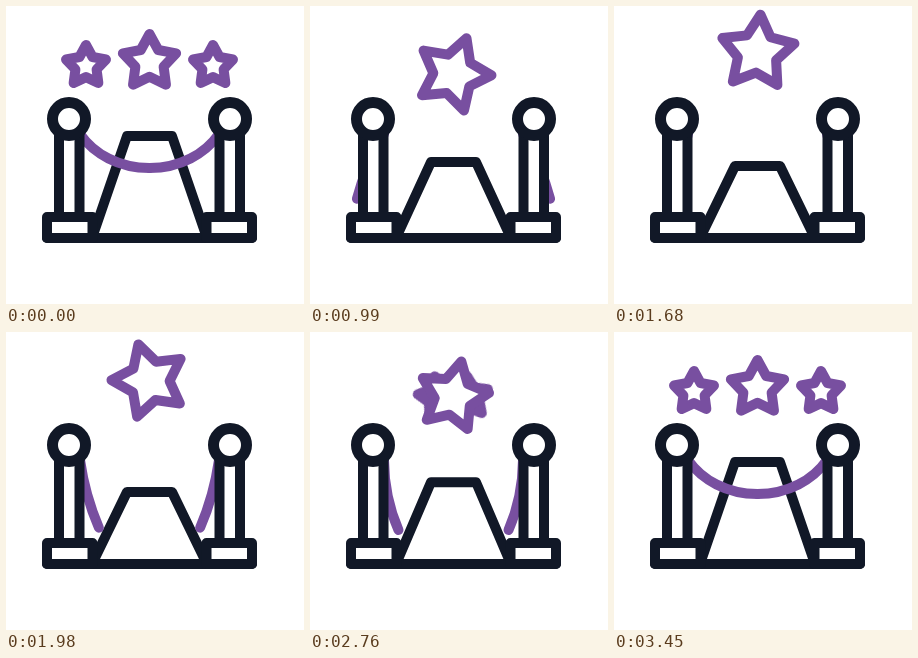
An HTML page that plays this animation: 298 by 298 pixels, repeating every 3.6 s.

```html
<!DOCTYPE html>
<html lang="en">
<head>
<meta charset="utf-8">
<title>Red carpet icon</title>
<style>
  html, body { margin: 0; width: 100%; height: 100%; overflow: hidden; background: #fff; }
  svg { display: block; width: 298px; height: 298px; }

  .dark, .purple { stroke-width: 10px; stroke-linecap: round; stroke-linejoin: round; fill: #fff; }
  .dark { stroke: #111827; }
  .purple { stroke: #784fa0; }
  #star { vector-effect: non-scaling-stroke; }
  .rope, #carpet { fill: none; }

  .side, .main, .rope, #carpet {
    animation-duration: 3600ms;
    animation-iteration-count: infinite;
    animation-timing-function: cubic-bezier(.333, 0, .667, 1);
  }
  .main { animation-name: main-move, main-turn, main-grow; }
  .side { scale: 21; animation-name: side-move, side-show; }
  .rope { animation-name: swing, straighten; }
  #carpet { animation-name: carpet; }

  /* merge, jump, land, split */
  @keyframes main-move {
    0%, 9.17% { translate: 143.5px 56px; }
    27.5%, 29.17% { translate: 143.5px 68px; }
    50% { translate: 143.5px 45px; }
    69% { translate: 143.5px 66.5px; }
    95%, 100% { translate: 143.5px 56px; }
  }
  /* wind up one way, then a full turn the other way */
  @keyframes main-turn {
    0%, 9.17% { rotate: 0deg; }
    27.5%, 28.33% { rotate: 20deg; animation-timing-function: cubic-bezier(.333, .15, .667, .85); }
    69% { rotate: -344deg; }
    95%, 100% { rotate: -360deg; }
  }
  @keyframes main-grow {
    0%, 9.17%, 95%, 100% { scale: 28; }
    27.5%, 68.33% { scale: 38; }
  }
  @keyframes side-move {
    0%, 9.17%, 95%, 100% { translate: 80px 60px; rotate: 0deg; }
    28.33% { translate: 143.5px 68px; rotate: 80deg; }
    68.33% { translate: 143.5px 66.5px; rotate: var(--unroll); }
  }
  @keyframes side-show {
    0%, 95%, 100% { opacity: 1; animation-timing-function: step-end; }
    27% { opacity: 0; animation-timing-function: step-end; }
    69.5% { opacity: 1; animation-timing-function: step-end; }
  }
  /* the rope parts and its halves swing to rest */
  @keyframes swing {
    0%, 9.17% { rotate: 0deg; }
    25.42% { rotate: 98deg; }
    32.5% { rotate: 44deg; }
    43.6% { rotate: 80deg; }
    54.4% { rotate: 48deg; }
    66.1% { rotate: 75deg; }
    95%, 100% { rotate: 0deg; }
  }
  @keyframes straighten {
    0%, 9.17%, 95%, 100% { d: path("M0 0 C14 20 39 34 69.5 34"); }
    20%, 70% { d: path("M0 0 C19.5 13 40.5 23.5 63 31"); }
  }
  @keyframes carpet {
    0%, 9.17%, 95%, 100% { d: path("M86 232 L121 130 L166 130 L201 232"); }
    33%, 65.3% { d: path("M86 232 L121 160 L166 160 L201 232"); }
  }
</style>
</head>
<body>
<svg viewBox="0 0 298 298">
  <defs>
    <polygon id="star" class="purple"/>
    <g id="post" class="dark">
      <rect x="53" y="125" width="20.5" height="86"/>
      <rect x="41" y="211" width="45.5" height="21"/>
      <circle cx="63" cy="113" r="16.5" stroke-width="11"/>
    </g>
  </defs>

  <use class="side" href="#star" style="--unroll: 80deg"/>
  <g transform="translate(287) scale(-1 1)">
    <use class="side" href="#star" style="--unroll: 99deg"/>
  </g>
  <use class="main" href="#star"/>

  <path id="carpet" class="dark" d="M86 232 L121 130 L166 130 L201 232"/>
  <path class="dark" d="M41 232 H246"/>

  <g transform="translate(74 128)">
    <path class="rope purple" d="M0 0 C14 20 39 34 69.5 34"/>
  </g>
  <g transform="translate(213 128) scale(-1 1)">
    <path class="rope purple" d="M0 0 C14 20 39 34 69.5 34"/>
  </g>

  <use href="#post"/>
  <use href="#post" transform="translate(287) scale(-1 1)"/>
</svg>
<script>
  // five-pointed star of radius 1, one tip up
  const corners = Array.from({ length: 10 }, (_, i) => {
    const r = i % 2 ? 0.53 : 1, a = i * Math.PI / 5;
    return `${r * Math.sin(a)},${-r * Math.cos(a)}`;
  });
  document.getElementById("star").setAttribute("points", corners.join(" "));
</script>
</body>
</html>
```
